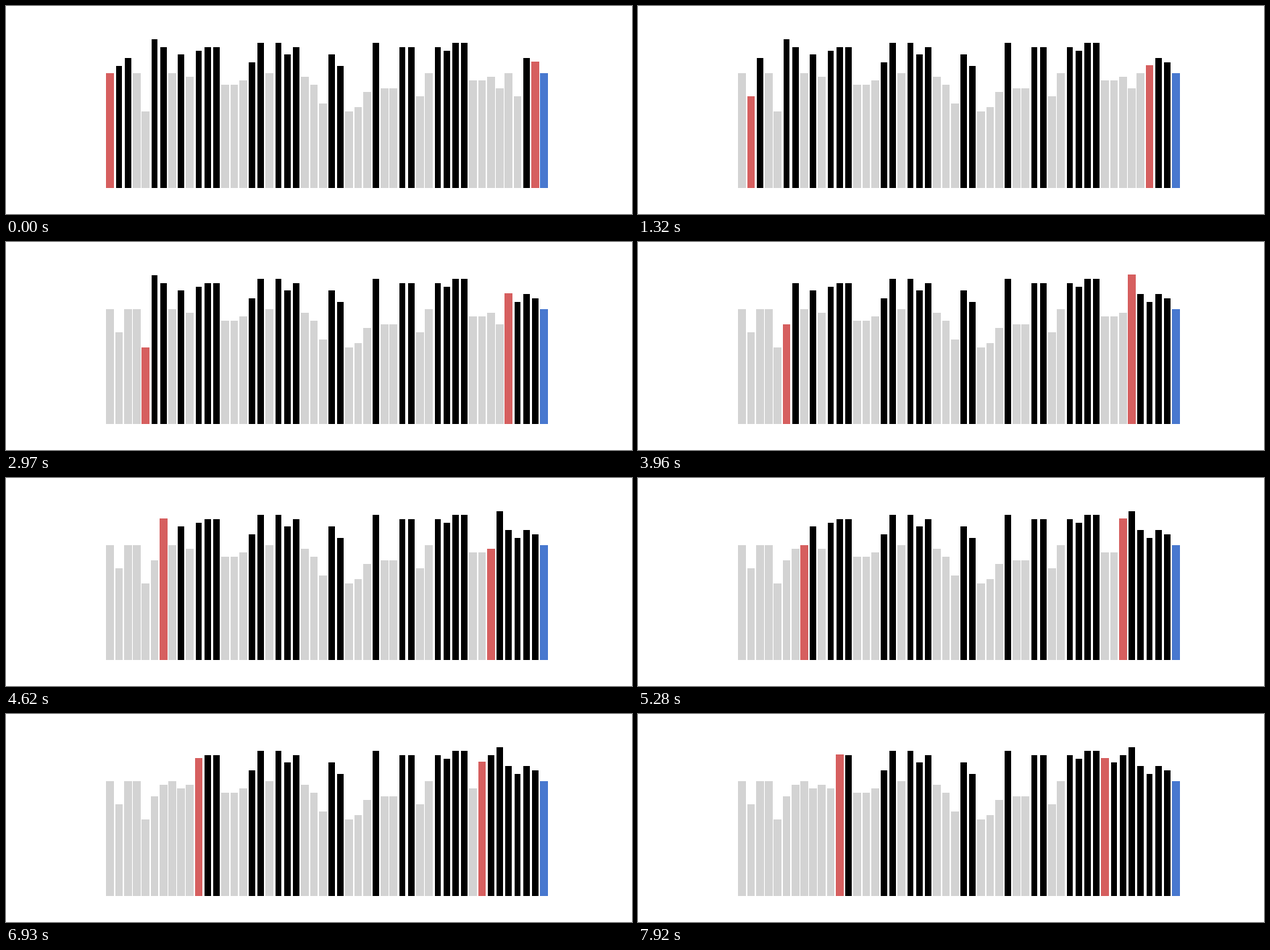
Write an HTML page that moves like this. It is 864 px wide and 288 px high and loops after 8 s.

```html
<!DOCTYPE html>
<html lang="en">
<head>
<meta charset="utf-8">
<title>Partition step</title>
<style>
  html, body { margin: 0; width: 100%; height: 100%; overflow: hidden; background: #fff; }
  svg { display: block; width: 100%; height: 100%; }
</style>
</head>
<body>
<svg id="chart" viewBox="0 0 864 288" shape-rendering="crispEdges"></svg>
<script>
const LOOP = 8000, STEP = 330;
const BASE = 252, UNIT = 5.31, PITCH = 12.22, LEFT = 138.45, RIGHT = 149.23;
const RED = '#d65f5f', BLUE = '#4878cf', GREY = '#d3d3d3', BLACK = '#000';

const values = [
  30, 32, 34, 30, 20, 39, 37, 30, 35, 29, 36, 37, 37, 27, 27, 28, 33,
  38, 30, 38, 35, 37, 29, 27, 22, 35, 32, 20, 21, 25, 38, 26, 26, 37,
  37, 24, 30, 37, 36, 38, 38, 28, 28, 29, 26, 30, 24, 34, 33, 30
];
const last = values.length - 1;
const pivot = values[last];

// Two-pointer partition around the last value, one state per step.
function partition(count) {
  const a = values.slice();
  const states = [];
  let i = 0, j = last - 1;
  while (states.length < count) {
    states.push({ a: a.slice(), i, j });
    if (a[i] <= pivot) i++;
    else if (a[j] > pivot) j--;
    else [a[i], a[j]] = [a[j], a[i]];
  }
  return states;
}

const states = partition(Math.ceil(LOOP / STEP));
const chart = document.getElementById('chart');
const bars = values.map(() =>
  chart.appendChild(document.createElementNS('http://www.w3.org/2000/svg', 'rect')));

function colour(state, k) {
  if (k === last) return BLUE;
  if (k === state.i || k === state.j) return RED;
  return state.a[k] > pivot ? BLACK : GREY;
}

function draw(state) {
  bars.forEach((bar, k) => {
    const fill = colour(state, k);
    const inset = fill === BLACK ? 1 : 0;
    const x = Math.round(LEFT + PITCH * k) + inset;
    const y = Math.round(BASE - UNIT * state.a[k]) + inset;
    bar.setAttribute('x', x);
    bar.setAttribute('y', y);
    bar.setAttribute('width', Math.round(RIGHT + PITCH * k) - inset - x);
    bar.setAttribute('height', BASE - y);
    bar.setAttribute('fill', fill);
  });
}

const start = performance.now();
function tick() {
  const t = (performance.now() - start) % LOOP;
  draw(states[Math.floor(t / STEP)]);
  requestAnimationFrame(tick);
}
tick();
</script>
</body>
</html>
```
